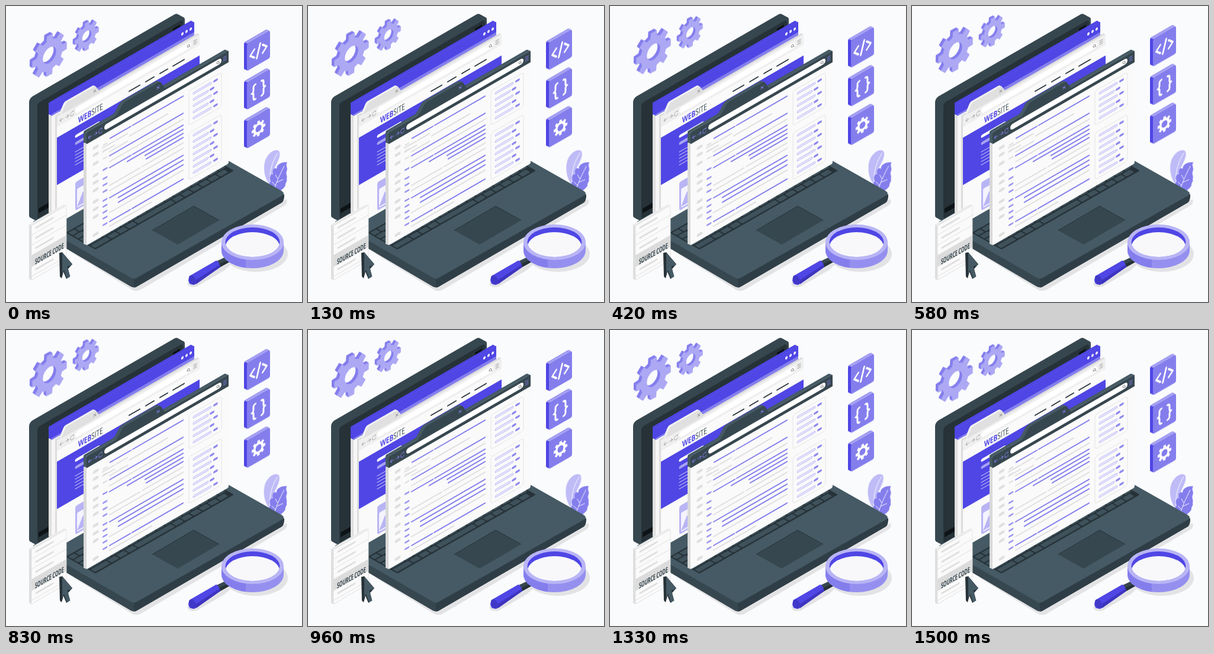
Write an HTML page that moves like this. It is 500x500 px and loops after 1.54 s.

```html
<!DOCTYPE html>
<html lang="en">
<head>
<meta charset="utf-8">
<title>Source code</title>
<style>
html, body { margin: 0; width: 100%; height: 100%; overflow: hidden; background: #fafbfd; }
svg { display: block; width: 100vw; height: 100vh; }
text { font-family: "Open Sans", sans-serif; }
.float { animation: float 1540ms linear -60ms infinite; }
.wind { animation: wind 1540ms linear -60ms infinite; transform-origin: 452px 318px; }
@keyframes float { 50% { transform: translateY(-10px); } }
@keyframes wind { 25% { transform: rotate(1deg); } 75% { transform: rotate(-1deg); } }
</style>
</head>
<body>
<svg viewBox="0 0 500 500">
  <!-- ground shadows -->
  <g fill="#e3e3e5">
    <path d="M110 416L214 480Q221 483 228 479L472 336Q476 332 474 326L216 460Z"/>
    <ellipse cx="422" cy="419" rx="54" ry="30"/>
    <path d="M306 468L366 437L383 434L370 446L322 474Q308 477 306 468Z"/>
  </g>

  <g class="wind">
    <path fill="#bfbbf7" d="M449 304C437 296 433 275 438 260C443 247 455 240 461 245C465 252 459 263 454 273C449 285 448 295 449 304Z"/>
    <path fill="none" stroke="#fff" stroke-width=".9" d="M446 300C444 280 450 262 459 248"/>
    <path fill="#847eed" d="M449 314C443 308 443 300 447 296C444 290 446 284 451 284C449 277 453 272 457 275C457 267 466 263 475 264C471 270 477 273 474 279C472 284 476 287 474 292C476 296 471 299 472 303C469 309 463 313 452 318Z"/>
    <path fill="none" stroke="#fff" stroke-width=".9" d="M451 318C455 300 463 284 470 270M455 303L449 297M459 292L455 285M457 298L468 293"/>
  </g>

  <g id="lid"></g>

  <!-- laptop base -->
  <path fill="#37474f" d="M46 364V377L211 474Q216 476.500 221 474L466 332Q470 329 470 318Z"/>
  <path fill="#2f3e46" d="M216 460V475.500Q219 475.500 221 474L466 332Q470 329 470 318Z"/>
  <path fill="#455a64" d="M46 364L300 218.500L465 312Q473 317 465 321L221 459Q216 462 211 459Z"/>
  <g id="keys" transform="matrix(1 -.57 1 .57 101 383)"></g>
  <path fill="#37474f" d="M247 379L317 338L360 362L290 403Z"/>
  <path fill="none" stroke="#263238" d="M247 379L317 338L360 362"/>

  <g id="site"></g>
  <g id="code"></g>

  <!-- document -->
  <path fill="#dedede" d="M39 369L43 371V463L39 461Z"/>
  <path fill="#ececec" d="M39 369L98 335L102 337L43 371Z"/>
  <g transform="matrix(1 -.577 0 1 43 371)">
    <path fill="#fafafa" stroke="#e0e0e0" stroke-width=".8" d="M0 0H59V92H0Z"/>
    <path fill="#dcdcdc" d="M0 50H59V70H0Z"/>
    <path stroke="#e0e0e0" stroke-width="1" d="M0 16H59M0 33H59M0 86H59"/>
    <path stroke="#dedede" stroke-width="3.200" stroke-linecap="round" d="M8 8H36M8 25H36M8 42H36M8 78H36"/>
  </g>
  <text transform="matrix(.54 -.312 0 1 49 437)" font-size="13" font-weight="700" fill="#37474f">SOURCE CODE</text>

  <!-- pointer -->
  <path fill="#263238" d="M90 417L95 416L112 436L105 444L108 457L102 461L97 449L94 460L91 457Z"/>
  <path fill="#455a64" d="M95 416L112 437L103.500 440L108.500 457L103 460L98 446L95 452Z"/>

  <!-- magnifier -->
  <path fill="#37474f" d="M356 431L377 421Q382 422 382 430L360 442Z"/>
  <path fill="#263238" d="M359 436L382 426V430L360 442Z"/>
  <path fill="#4f46e5" d="M310 456L355 430Q360 431 362 441L321 469Q309 474 308 463Z"/>
  <path fill="#3d35bf" d="M319 464L361 437L362 441L321 470Z"/>
  <ellipse cx="315" cy="463" rx="5.500" ry="8.500" fill="#4038c8" transform="rotate(-28 315 463)"/>
  <path fill="#9590ef" d="M364 399V413A52.500 30 0 0 0 469 413V399Z"/>
  <path fill="#847eed" d="M364 399V413A52.500 30 0 0 0 405 442.300V428Z"/>
  <ellipse cx="416.500" cy="399" rx="52.500" ry="30" fill="#b9b5f5"/>
  <clipPath id="lens"><ellipse cx="416.500" cy="399" rx="46" ry="25"/></clipPath>
  <g clip-path="url(#lens)">
    <path fill="#4f46e5" d="M364 369H470V430H364Z"/>
    <ellipse cx="416.500" cy="407" rx="46" ry="25" fill="#f8f8fb"/>
  </g>

  <g transform="translate(0 .8)"><g class="float" id="floaters"></g></g>
</svg>
<script>
const VIOLET = '#4f46e5', LIGHT = '#847eed', PALE = '#b9b5f5', GREY = '#dfdfdf', DARK = '#37474f', SLATE = '#455a64';
const add = (id, html) => document.getElementById(id).insertAdjacentHTML('beforeend', html);
const plane = (x, y, html) => `<g transform="matrix(1 -.577 0 1 ${x} ${y})">${html}</g>`;
const shape = (d, fill, extra = '') => `<path d="${d}" fill="${fill}" ${extra}/>`;
const rect = (x, y, w, h, fill, r = 0, extra = '') =>
  `<rect x="${x}" y="${y}" width="${w}" height="${h}" rx="${r}" fill="${fill}" ${extra}/>`;
const line = (d, color, w) =>
  `<path d="${d}" fill="none" stroke="${color}" stroke-width="${w}" stroke-linecap="round" stroke-linejoin="round"/>`;
const bar = (x1, x2, y, color, w = 2.2) => line(`M${x1} ${y}H${x2}`, color, w);

// Thickness: repeat a shape from back to front along the depth axis.
const slab = (draw, depth, rise) => {
  let out = '';
  for (let i = depth; i > 0; i--) out += `<g transform="translate(${-i} ${-i * rise})">${draw}</g>`;
  return out;
};

const gear = (R, hole, turn = -89) => {
  const at = (r, a) => `${(r * Math.cos(a)).toFixed(2)} ${(r * Math.sin(a)).toFixed(2)}`;
  const pts = [];
  for (let i = 0; i < 8; i++) {
    const a = (turn + i * 45) * Math.PI / 180;
    pts.push(at(R * .75, a - .25), at(R, a - .17), at(R, a + .17), at(R * .75, a + .25));
  }
  return `M${pts.join('L')}ZM${hole} 0A${hole} ${hole} 0 1 0 ${-hole} 0A${hole} ${hole} 0 1 0 ${hole} 0Z`;
};
const evenodd = 'fill-rule="evenodd" stroke-linejoin="round"';
const browserIcons = (x, y, color) => line(
  `M${x + 6} ${y}h-6l2.500 -2.500m-2.500 2.500l2.500 2.500M${x + 9} ${y}h6l-2.500 -2.500m2.500 2.500l-2.500 2.500` +
  `M${x + 23} ${y - 2}a3 3.500 0 1 0 .5 3.500m-.5 -3.500v-2`, color, .9);
const cross = (x, y, color) => line(`M${x - 2} ${y - 2}l4 4m0 -4l-4 4`, color, 1);
const finder = (x, y) => `<circle cx="${x}" cy="${y}" r="2" fill="none" stroke="#666" stroke-width=".7"/>` +
  line(`M${x + 1.5} ${y + 1.5}l1.500 1.500`, '#666', .7);
const menu = (x, y, color) => [-3, 0, 3].map(d => bar(x, x + 5, y + d, color, 1)).join('');

// Lid
const lidBox = fill => rect(0, 0, 252, 204, fill, 6);
add('lid', plane(50, 162, slab(lidBox(DARK), 11, 1.12) + lidBox(DARK) + rect(3, 4, 246, 197, '#263238', 5) +
  shape('M5 183H30V191H5ZM232 10H244V19H232Z', '#0d1316')));

// Keyboard
let keys = rect(0, 0, 234, 50, '#263238', 2);
for (let r = 0; r < 5; r++) {
  let x = 2, n = 0;
  while (x < 226) {
    const w = r === 4 && n === 4 ? 62 : n === 0 ? 10 + r * 4 : 13;
    keys += rect(x, 2 + r * 9.5, Math.min(w, 232 - x), 7.5, '#3f525c', 1.2);
    x += w + 2;
    n++;
  }
}
add('keys', keys);

// Website window
add('site', plane(77, 166,
  slab(rect(0, 0, 241, 20, VIOLET, 1) + rect(0, 20, 20, 166, GREY), 5, 1.1) +
  rect(0, 0, 241, 27, LIGHT) + rect(0, 0, 241, 17, VIOLET) + rect(0, 20, 14, 169, '#f6f6f6') +
  [221, 228, 235].map(x => `<ellipse cx="${x}" cy="8.500" rx="2" ry="2.400" fill="#fff"/>`).join('')));

const siteTab = 'M7 1L13 -10Q15 -14 18 -14H62Q66 -14 67 -10L73 1Z';
add('site', plane(86, 186.5,
  slab(rect(0, 0, 241, 182, '#dcdcdc') + shape(siteTab, '#f2f2f2'), 3, 1.1) +
  rect(0, 0, 241, 182, '#fafafa') + rect(0, 0, 241, 18, '#efefef') + shape(siteTab, '#e0e0e0') +
  rect(31, 4, 196, 10, '#fff', 5) + browserIcons(5, 10, '#a5a5a5') + cross(64, -6, '#999') +
  finder(222, 9) + menu(231, 9, '#999') +
  [[122, 140], [150, 164], [174, 187], [196, 215]].map(([a, b]) => bar(a, b, 28, '#263238', 2)).join('') +
  rect(0, 36, 241, 80, VIOLET) +
  bar(33, 70, 52, '#fff', 5) + bar(33, 70, 64, '#a7a2f2', 5) +
  [78, 83.5, 89, 94.5, 100].map(y => bar(31, 60, y, '#d8d6fb', 1)).join('') +
  rect(31, 129, 60, 48, PALE, 3) + rect(34, 142, 50, 32, '#f4f3fe', 2) +
  shape('M34 172L44 152L54 172Z', PALE)));
add('site', `<text transform="matrix(.72 -.415 0 1 122 198)" font-size="14" fill="#37474f"><tspan font-weight="700" fill="${VIOLET}">WEB</tspan>SITE</text>`);

// Code window
const codeTab = 'M48 1Q52 0 54 -3L60 -11Q62 -14 67 -14H121Q126 -14 127 -9L132 1Z';
let code = slab(rect(0, 0, 240, 20, SLATE, 2) + rect(0, 20, 240, 171, '#d9d9d9', 1) + shape(codeTab, SLATE), 5, 1) +
  rect(0, 0, 240, 191, '#fafafa', 2) + shape('M0 20V2Q0 0 2 0H238Q240 0 240 2V20Z', DARK) + shape(codeTab, DARK) +
  rect(30, 5, 198, 9.5, '#fff', 4.7) + browserIcons(3, 11, LIGHT) + cross(121, -6, LIGHT) +
  finder(222, 10) + menu(231, 10, LIGHT);

[34, 46, 61, 81, 93, 106, 125, 138, 151, 181].forEach(y => { code += bar(13, 18, y, GREY, 5); });
[38, 48, 61].forEach(y => { code += bar(28.5, 34, y, GREY, 2.5); });
[80, 95, 106, 117, 132, 142, 152, 162, 173].forEach(y => { code += bar(28.5, 34, y, '#9c97f0', 3); });

[[33, 40, 75, 1], [33, 78, 163, 1], [42, 27, 47], [42, 50, 69], [48, 73, 137], [49, 27, 47], [55, 39, 69],
 [62, 39, 163, 1], [72, 39, 163], [82, 39, 75, 1], [82, 78, 163, 1], [89, 69, 163, 1], [96, 99, 163, 1],
 [103, 101, 163, 1], [112, 39, 90], [112, 94, 163], [121, 39, 163], [133, 39, 163, 1], [141, 54, 163, 1],
 [149, 54, 163, 1], [158, 39, 163], [173, 39, 74, 1], [173, 77, 163, 1], [181, 39, 110]
].forEach(([y, a, b, hot]) => { code += bar(a, b, y, hot ? LIGHT : GREY); });

const card = (y, h, rows) => {
  code += rect(173, y, 55, h, 'none', 4, 'stroke="#e4e4e6" stroke-width="1"');
  for (let i = 0; i < rows; i++) {
    const v = y + 8 + i * 10.5, short = i % 2;
    code += rect(180, v - 1.5, short ? 26 : 31, 3.4, '#e6e4fc', 1.7, `stroke="${PALE}" stroke-width=".8"`) +
      bar(short ? 210 : 216, short ? 214 : 220, v, '#8e88ee', 3.8);
  }
};
card(30, 58, 5);
card(101, 79, 7);
add('code', plane(136, 213.5, code));

// Floating gears and tiles
const bigGear = (x, y, R, hole, depth) => {
  const d = gear(R, hole);
  return `<g transform="matrix(.866 -.5 0 1 ${x} ${y})">` +
    slab(shape(d, LIGHT, evenodd), depth, 1.05) + shape(d, '#aca8f4', evenodd) + '</g>';
};
const tile = (y, sign) => plane(407, y,
  slab(rect(0, 0, 39, 46, VIOLET, 2.5), 5, 1.05) +
  shape('M-4 -4.800L1 0H38L34 -4.800Z', '#a7a2f2') + rect(0, 0, 39, 46, LIGHT, 2.5) + sign);
const brace = 'M14.500 11Q11 11 11 15V20Q11 23 8 23.500Q11 24 11 27V32Q11 36 14.500 36';

add('floaters',
  bigGear(73.5, 83, 34.2, 13, 5) + bigGear(136.5, 51, 23.8, 9, 4) +
  tile(64, line('M12.500 16.500L5.500 23.500L12.500 30.500M26.500 16.500L33.500 23.500L26.500 30.500M22.500 12L16.500 34', '#fff', 3)) +
  tile(129.5, line(brace, '#fff', 3) + `<g transform="matrix(-1 0 0 1 39 0)">${line(brace, '#fff', 3)}</g>`) +
  tile(195, `<g transform="translate(19.500 23)scale(.9 1)">${shape(gear(13, 5.5), '#fff', evenodd)}</g>`));
</script>
</body>
</html>
```
